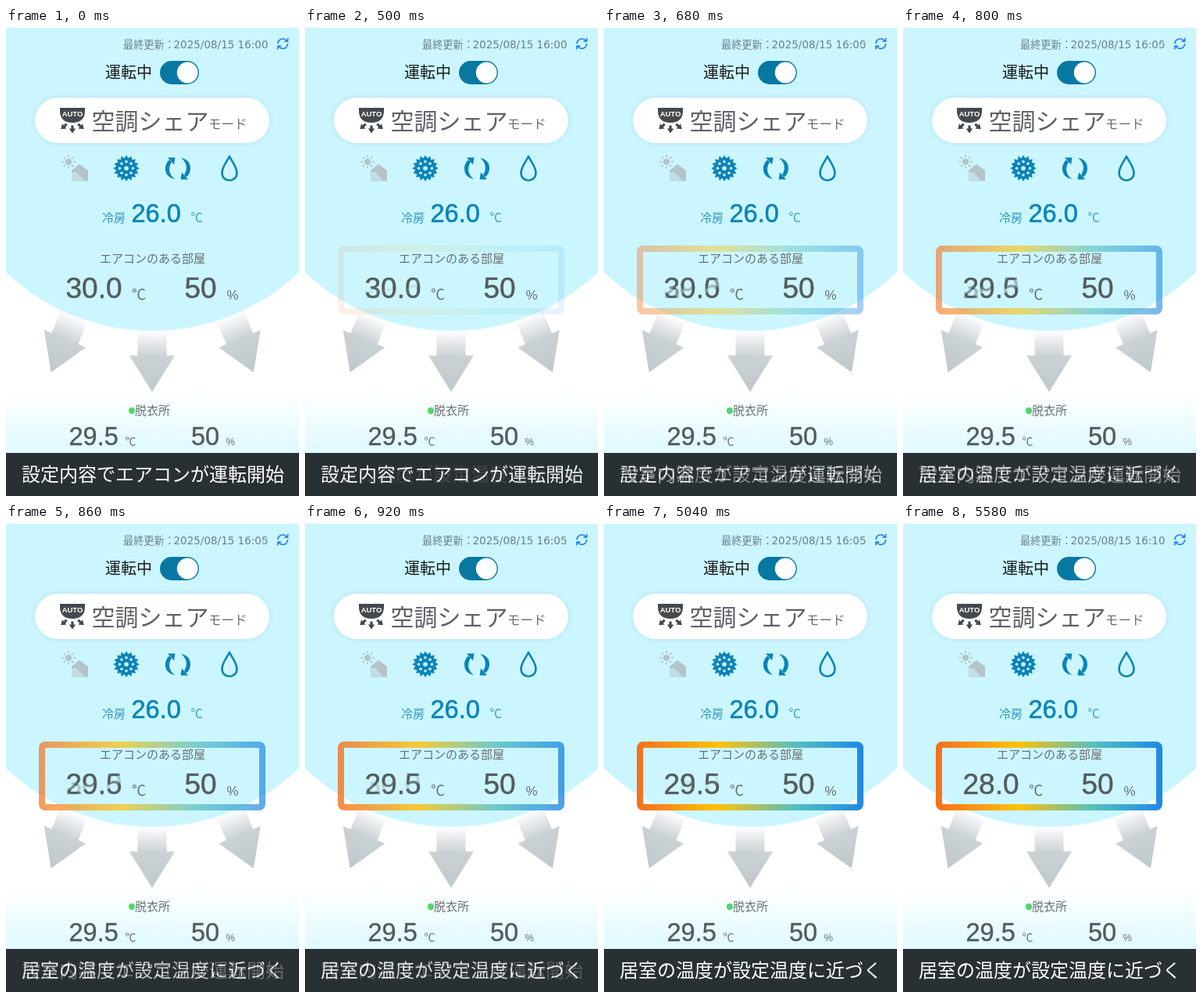
Write an HTML page with a canvas that moves like this. It is 375 px wide and 598 px high and loops after 8 s.

```html
<!DOCTYPE html>
<html lang="ja">
<head>
<meta charset="utf-8">
<title>空調リモコン</title>
<style>
html, body { margin: 0; width: 100%; height: 100%; overflow: hidden; background: #fff; }
canvas { display: block; }
</style>
</head>
<body>
<canvas id="stage" width="375" height="598"></canvas>
<script>
const W = 375, H = 598, LOOP = 8000, STEP = 60, STEPS = 10;
const CYAN = '#cbf6ff', BLUE = '#0b84b8', GREY = '#555a5d', SOFT = '#686f73', DARK = '#44494d', PALE = '#b4c3c8';
const JP = '"Noto Sans CJK JP", "Noto Sans CJK", sans-serif';
const NUM = '"Liberation Sans", Arial, sans-serif';

const views = [
  { clock: '16:00', room: '30.0', box: false, caption: '設定内容でエアコンが運転開始' },
  { clock: '16:05', room: '29.5', box: true, caption: '居室の温度が設定温度に近づく' },
  { clock: '16:10', room: '28.0', box: true, caption: '居室の温度が設定温度に近づく' }
];
const fades = [{ at: 500, from: 0 }, { at: 5040, from: 1 }];

function fillPoly(c, color, points) {
  c.fillStyle = color;
  c.beginPath();
  points.forEach(([x, y]) => c.lineTo(x, y));
  c.closePath();
  c.fill();
}

function disc(c, color, x, y, r) {
  c.fillStyle = color;
  c.beginPath();
  c.arc(x, y, r, 0, Math.PI * 2);
  c.fill();
}

function pill(c, color, x, y, w, h) {
  c.fillStyle = color;
  c.beginPath();
  c.roundRect(x, y, w, h, h / 2);
  c.fill();
}

function at(c, x, y, angle, draw) {
  c.save();
  c.translate(x, y);
  c.rotate(angle);
  draw();
  c.restore();
}

// Japanese text, placed by the vertical middle of its em box
function label(c, text, x, mid, size, color, weight = 400) {
  c.font = `${weight} ${size}px ${JP}`;
  c.fillStyle = color;
  c.fillText(text, x, mid + size * 0.36);
}

function number(c, text, x, y, size, color, heavy = 0) {
  c.font = `${size}px ${NUM}`;
  c.fillStyle = c.strokeStyle = color;
  c.fillText(text, x, y);
  if (heavy) {
    c.lineWidth = heavy;
    c.lineJoin = 'round';
    c.strokeText(text, x, y);
  }
}

function bigArrow(c, x, y, angle) {
  at(c, x, y, angle, () => {
    const g = c.createLinearGradient(0, -32, 0, 46);
    g.addColorStop(0, 'rgba(194,202,206,0)');
    g.addColorStop(0.42, 'rgba(194,202,206,.85)');
    g.addColorStop(1, '#bfc8cc');
    fillPoly(c, g, [[-18.5, -32], [18.5, -32], [18.5, 0], [29, 0], [0, 46.5], [-29, 0], [-18.5, 0]]);
  });
}

function backdrop(c) {
  c.fillStyle = '#fff';
  c.fillRect(0, 0, W, H);
  const g = c.createLinearGradient(0, 466, 0, 546);
  g.addColorStop(0, '#fff');
  g.addColorStop(1, '#dcf9ff');
  c.fillStyle = g;
  c.fillRect(0, 466, W, 132);
  disc(c, CYAN, 187.5, 115, 272);
  bigArrow(c, 75.5, 397, 0.394);
  bigArrow(c, 187, 418.5, 0);
  bigArrow(c, 299, 397, -0.394);
}

function refreshIcon(c) {
  c.strokeStyle = '#1c7cf2';
  c.lineWidth = 1.6;
  c.lineCap = c.lineJoin = 'round';
  for (const turn of [0, Math.PI]) {
    at(c, 354.3, 20, turn, () => {
      c.beginPath();
      c.arc(0, 0, 6.3, Math.PI * 1.03, Math.PI * 1.82);
      c.moveTo(6.4, -6.8);
      c.lineTo(6.4, -3);
      c.lineTo(2.6, -3);
      c.stroke();
    });
  }
}

function autoIcon(c) {
  c.fillStyle = DARK;
  c.beginPath();
  c.moveTo(69, 102);
  c.lineTo(101, 102);
  c.lineTo(101, 106);
  c.bezierCurveTo(101, 116, 95, 121, 85, 121);
  c.bezierCurveTo(75, 121, 69, 116, 69, 106);
  c.fill();
  c.font = `bold 9.5px ${NUM}`;
  c.fillStyle = '#fff';
  c.textAlign = 'center';
  c.fillText('AUTO', 85, 113);
  c.textAlign = 'left';
  const arrow = [[-1.6, -5], [1.6, -5], [1.6, -1], [4.2, -1], [0, 5], [-4.2, -1], [-1.6, -1]];
  for (const [x, y, angle] of [[74, 126, 0.85], [85, 129.5, 0], [96, 126, -0.85]]) {
    at(c, x, y, angle, () => fillPoly(c, DARK, arrow));
  }
}

function houseIcon(c) {
  disc(c, PALE, 80, 171, 4);
  c.strokeStyle = PALE;
  c.lineWidth = 1.7;
  c.lineCap = 'butt';
  for (let i = 0; i < 8; i++) {
    at(c, 80, 171, i * Math.PI / 4, () => {
      c.beginPath();
      c.moveTo(5.7, 0);
      c.lineTo(8.8, 0);
      c.stroke();
    });
  }
  fillPoly(c, PALE, [[84, 182], [94, 174], [105, 182], [105, 195.5], [84, 195.5]]);
  fillPoly(c, '#c2dde4', [[84, 184], [90, 184], [101, 195.5], [84, 195.5]]);
}

function coolIcon(c) {
  const teeth = 16, points = [];
  for (let i = 0; i < teeth * 2; i++) {
    const a = i * Math.PI / teeth - Math.PI / 2, r = i % 2 ? 13 : 16.7;
    points.push([154 + r * Math.cos(a), 179.3 + r * Math.sin(a)]);
  }
  fillPoly(c, BLUE, points);
  for (let i = 0; i < 8; i++) {
    const a = i * Math.PI / 4;
    disc(c, CYAN, 154 + 8.5 * Math.cos(a), 179.3 + 8.5 * Math.sin(a), 1.8);
  }
  disc(c, CYAN, 154, 179.3, 2.8);
}

function cycleIcon(c) {
  for (const turn of [0, Math.PI]) {
    at(c, 220, 179.5, turn, () => {
      c.fillStyle = BLUE;
      c.beginPath();
      c.moveTo(-4, 13.5);
      c.bezierCurveTo(-13, 12, -16.5, 6, -16, -1);
      c.quadraticCurveTo(-15.5, -7, -11, -11);
      c.lineTo(-8, -8);
      c.bezierCurveTo(-13, -1, -11.5, 8, -4, 13.5);
      c.fill();
      fillPoly(c, BLUE, [[-13, -14], [-3.5, -14], [-5, -5]]);
    });
  }
}

function dropIcon(c) {
  c.strokeStyle = BLUE;
  c.lineWidth = 2.6;
  c.lineJoin = 'round';
  c.beginPath();
  c.moveTo(286, 164);
  c.bezierCurveTo(282, 172, 276.5, 178, 276.5, 185);
  c.bezierCurveTo(276.5, 198, 295.5, 198, 295.5, 185);
  c.bezierCurveTo(295.5, 178, 290, 172, 286, 164);
  c.closePath();
  c.stroke();
}

function highlight(c) {
  const g = c.createLinearGradient(42, 0, 332, 0);
  g.addColorStop(0, '#f46f20');
  g.addColorStop(0.36, '#ffc107');
  g.addColorStop(0.7, '#55bfc0');
  g.addColorStop(1, '#1e88e5');
  c.fillStyle = g;
  c.beginPath();
  c.roundRect(42, 278, 290, 88, 8);
  c.rect(50, 286, 274, 72);
  c.fill('evenodd');
}

function header(c, clock) {
  label(c, '最終更新：', 150, 21, 13.2, '#6c828a');
  c.font = '13.5px "DejaVu Sans", sans-serif';
  c.fillText(`2025/08/15 ${clock}`, 214.5, 25.5);
  refreshIcon(c);
  label(c, '運転中', 127, 57, 20, '#1a1a1a');
  pill(c, '#0878a2', 197, 42, 50, 30);
  disc(c, '#fff', 232.2, 57, 13.4);
}

function modePill(c) {
  c.save();
  c.shadowColor = 'rgba(90,130,140,.2)';
  c.shadowBlur = 7;
  pill(c, '#fff', 37, 89, 300, 58);
  c.restore();
  autoIcon(c);
  label(c, '空調シェア', 109.5, 119, 30, '#5c6265', 300);
  label(c, 'モード', 259, 123.5, 16.5, SOFT, 300);
}

function readings(c, room) {
  label(c, '冷房', 123, 242.3, 15, '#2a94c2');
  number(c, '26.0', 160.5, 247.5, 32.5, BLUE, 0.6);
  label(c, '℃', 236.5, 242.3, 15.5, '#3b9dc7', 300);

  label(c, 'エアコンのある部屋', 120, 294.5, 15, SOFT);
  number(c, room, 76.5, 344.8, 37, GREY, 0.5);
  label(c, '℃', 161, 340.6, 18, SOFT, 300);
  number(c, '50', 228.5, 344.8, 37, GREY, 0.5);
  number(c, '%', 282.5, 347, 17, SOFT);

  disc(c, '#55d768', 161, 489, 4.2);
  label(c, '脱衣所', 165, 488.5, 15, SOFT);
  number(c, '29.5', 80.5, 533.3, 32.5, GREY, 0.4);
  label(c, '℃', 152.5, 527.7, 14, SOFT, 300);
  number(c, '50', 237, 533.3, 32.5, GREY, 0.4);
  number(c, '%', 281.5, 533, 13, SOFT);
}

function render(view) {
  const layer = document.createElement('canvas');
  layer.width = W;
  layer.height = H;
  const c = layer.getContext('2d');
  backdrop(c);
  header(c, view.clock);
  modePill(c);
  houseIcon(c);
  coolIcon(c);
  cycleIcon(c);
  dropIcon(c);
  if (view.box) highlight(c);
  readings(c, view.room);
  c.fillStyle = '#293033';
  c.fillRect(0, 543, W, 55);
  label(c, view.caption, 20, 570.6, 24, '#fff');
  return layer;
}

const layers = views.map(render);
const ctx = document.getElementById('stage').getContext('2d');

function draw(t) {
  let base = 0, mix = 0;
  for (const { at, from } of fades) {
    if (t < at) break;
    base = from;
    mix = Math.min(STEPS, Math.floor((t - at) / STEP) + 1) / STEPS;
  }
  ctx.globalAlpha = 1;
  ctx.drawImage(layers[base], 0, 0);
  if (mix) {
    ctx.globalAlpha = mix;
    ctx.drawImage(layers[base + 1], 0, 0);
  }
}

const start = performance.now();
function tick() {
  draw((performance.now() - start) % LOOP);
  requestAnimationFrame(tick);
}
tick();
</script>
</body>
</html>
```
